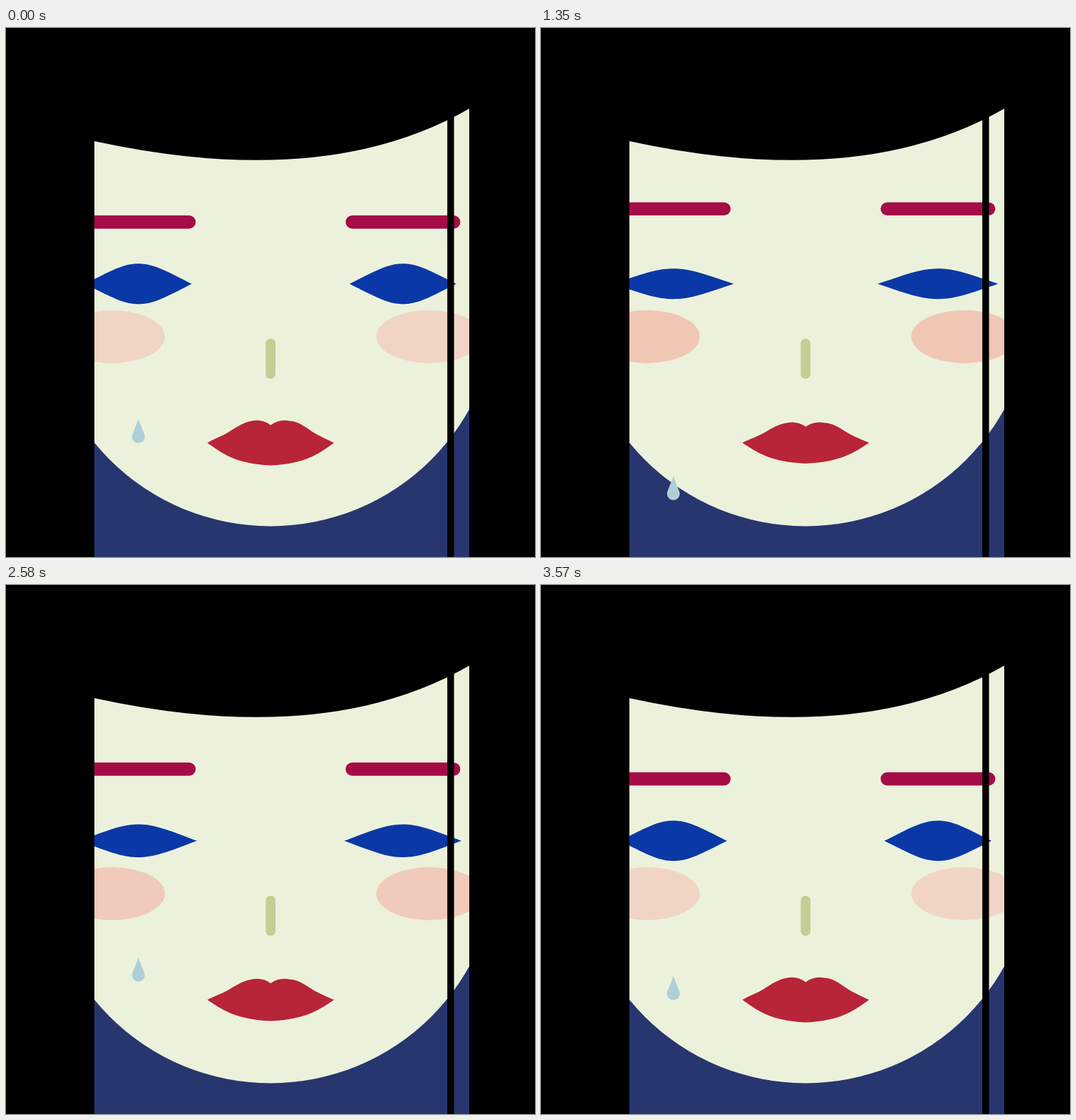
These frames come from a looping animation (748 px wide and 748 px high, 3.6 s). An HTML page:

```html
<!DOCTYPE html>
<html lang="en">
<head>
<meta charset="utf-8">
<title>Crying face</title>
<style>
  /* --p runs from -1 to 1 and passes 0 when the loop starts */
  @property --p { syntax: "<number>"; inherits: true; initial-value: 0; }

  html, body { margin: 0; width: 100%; height: 100%; overflow: hidden; background: #000; }
  svg { display: block; width: 100vw; height: 100vh; }

  .face {
    --k: max(var(--p), -1 * var(--p));
    animation: sob 3.6s linear -1.8s infinite;
  }
  .brows { fill: #a60b47; transform: translateY(calc(-24.93px * var(--k))); }
  .eye { fill: #0a38a6; transform: scale(calc(1 + .17 * var(--k)), calc(1 - .333 * var(--k))); }
  .lips { fill: #b82438; transform: scaleY(calc(1 - .115 * var(--k))); }
  .tear {
    fill: #aecfd8;
    transform: translateY(calc(254px * var(--p) * var(--p) * var(--p) * var(--k)));
  }
  .cheeks { fill: #f0d5c6; animation: blush 1.8s linear infinite alternate; }

  @keyframes sob { from { --p: -1; } to { --p: 1; } }
  @keyframes blush { from { fill: #f0d5c6; } to { fill: #f0c1b0; } }
</style>
</head>
<body>
<svg viewBox="0 0 748 748">
  <defs>
    <clipPath id="window"><rect x="125" width="530" height="748"/></clipPath>
    <path id="eye" d="M-75.5 0C-37.4 -19.3 -21 -28.6 0 -28.6S37.4 -19.3 75.5 0C37.4 19.3 21 28.6 0 28.6S-37.4 19.3 -75.5 0Z"/>
  </defs>
  <rect width="748" height="748"/>
  <g class="face" clip-path="url(#window)">
    <rect x="125" width="530" height="748" fill="#27366f"/>
    <circle cx="374" cy="382.7" r="321.7" fill="#ecf1db"/>
    <rect x="125" width="530" height="382" fill="#ecf1db"/>
    <path d="M125 0V160Q452 231 655 114V0Z"/>
    <g class="cheeks">
      <ellipse cx="149.6" cy="436.5" rx="75" ry="37.4"/>
      <ellipse cx="598.6" cy="436.5" rx="75" ry="37.4"/>
    </g>
    <g transform="translate(187.2 553.3)">
      <path class="tear" d="M0 0L-8.4 21.3A9 9 0 1 0 8.4 21.3Z"/>
    </g>
    <g class="brows">
      <rect x="106" y="265.1" width="162.2" height="18.7" rx="9.35"/>
      <rect x="480.2" y="265.1" width="162.2" height="18.7" rx="9.35"/>
    </g>
    <g transform="translate(187.2 361.8)"><use class="eye" href="#eye"/></g>
    <g transform="translate(561.2 361.8)"><use class="eye" href="#eye"/></g>
    <rect x="367.3" y="439.6" width="13.7" height="56.2" rx="6.3" fill="#c3cd94"/>
    <g transform="translate(374.3 586.5)">
      <path class="lips" d="M-89.6 0C-81 -5 -69 -9.5 -61.5 -14C-53 -19 -40 -29 -26 -31C-17 -33 -8 -31 0 -25C8 -31 17 -33 26 -31C40 -31 53 -19 61.5 -14C69 -9.5 81 -4 89.6 0C70 14 50 30 0 32C-50 30 -70 14 -89.6 0Z"/>
    </g>
    <rect x="624" width="9.5" height="748"/>
  </g>
</svg>
</body>
</html>
```
